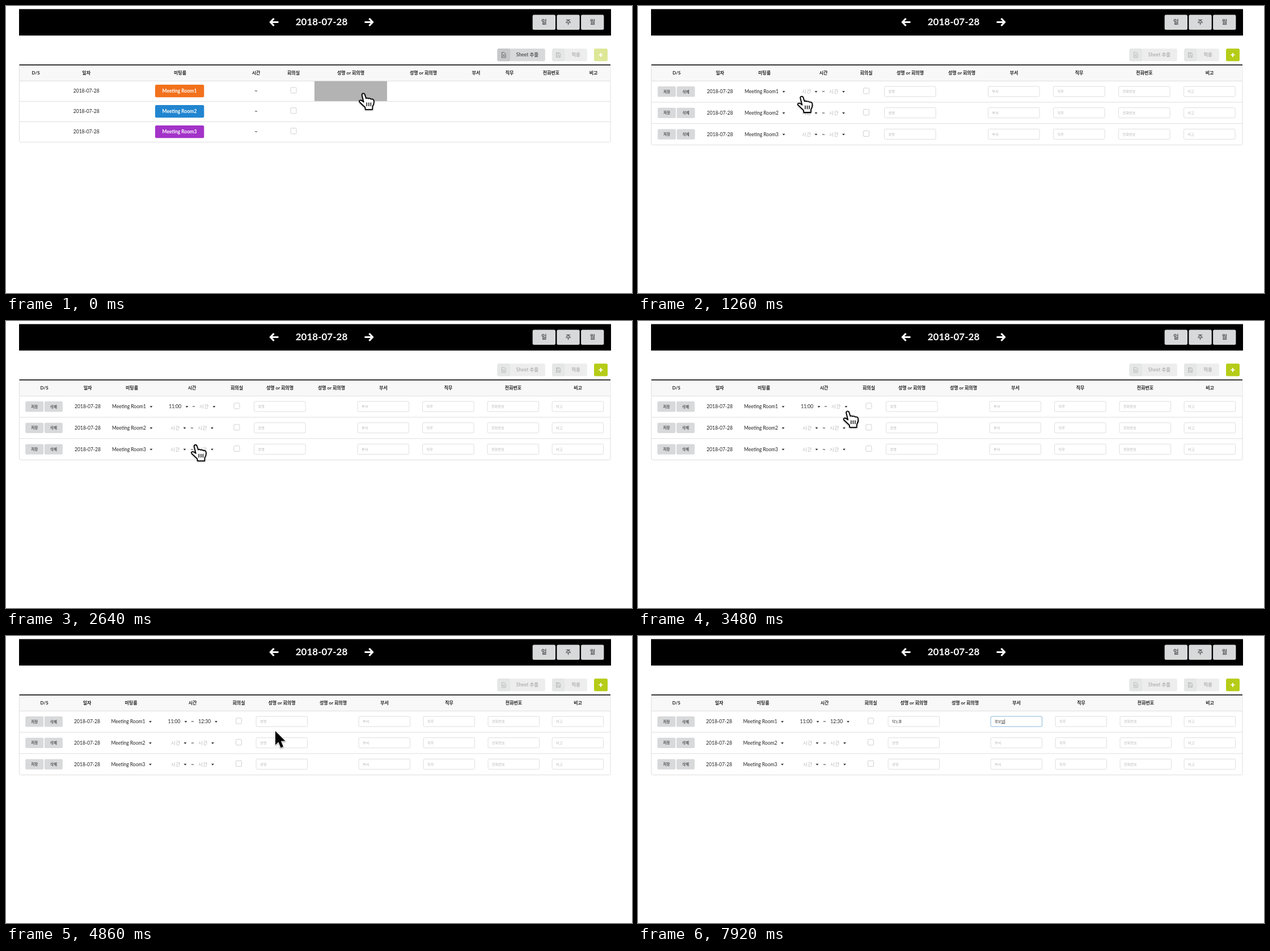
An HTML page for the animation above (8000 ms loop, 1104x507 px).

```html
<!DOCTYPE html>
<html lang="ko">
<head>
<meta charset="utf-8">
<title>회의실 예약</title>
<style>
html, body { margin: 0; width: 100%; height: 100%; overflow: hidden; background: #fff; }
svg { display: block; width: 1104px; height: 507px; font-family: Lato, 'Noto Sans CJK KR', 'Noto Sans CJK', sans-serif; }
.shadow { filter: drop-shadow(0 1px 1.2px rgba(0,0,0,.4)); }
</style>
</head>
<body>
<svg id="stage" viewBox="0 0 1104 507"></svg>
<script>
const stage = document.getElementById('stage');
const LOOP = 8000, STEP = 60;
const INK = '#222', PALE = '#b5b5b5', LINE = '#dededf';

// Moments at which the page changes state
const EDIT = 60, OPEN1 = 1560, PICK1 = 2520, OPEN2 = 3540, PICK2 = 4440;
const FOCUS = 5340, LEAVE = 7080;

const TITLES = ['D/S', '일자', '미팅룸', '시간', '회의실', '성명 or 회의명', '성명 or 회의명', '부서', '직무', '전화번호', '비고'];
const COLUMNS = {
  view:  [52.5, 141.7, 307, 441, 507, 608, 736, 829, 888, 961.5, 1036],
  blank: [68, 144.5, 223, 327, 402.5, 480, 571, 663, 778, 893, 1008],
  start: [67.5, 144, 222, 328, 407, 483, 574, 665.5, 780, 894.5, 1008.5],
  both:  [67.5, 143, 220.5, 329, 410.5, 486.5, 577, 667.5, 781.5, 895.5, 1008.5]
};
const FIELDS = { 5: '성명', 7: '부서', 8: '직무', 9: '전화번호', 10: '비고' };
const ROOM_COLORS = ['#f2711c', '#2185d0', '#a333c8'];

// time, x, y, shape used from here on
const POINTER = [
  [0, 630, 155, 'hand'], [60, 630, 155, 'arrow'], [720, 377, 181, 'arrow'], [840, 321, 167, 'arrow'],
  [1020, 243, 161, 'hand'], [1320, 300, 160, 'hand'], [1560, 300, 160, 'hand'], [1740, 309, 252, 'hand'],
  [1800, 322, 280, 'hand'], [1860, 333, 300, 'hand'], [2100, 320, 306, 'hand'], [2340, 312, 258, 'hand'],
  [2520, 312, 258, 'hand'], [2700, 345, 200, 'arrow'], [2940, 388, 122, 'arrow'], [3180, 392, 158, 'arrow'],
  [3240, 380, 159, 'hand'], [3300, 369.5, 160, 'hand'], [3540, 369.5, 160, 'hand'], [3780, 362, 230, 'hand'],
  [4200, 362, 320, 'hand'], [4440, 362, 320, 'hand'], [4500, 380, 295, 'arrow'], [4860, 475, 168, 'arrow'],
  [4980, 488, 157, 'beam'], [5220, 515, 152, 'beam'], [5400, 515, 152, 'none']
];
const NAME_KEYS = [[5880, 'ㅌ'], [5940, '타'], [6240, '탁'], [6720, '탁ㄴ'], [6780, '탁노'], [6900, '탁노으'], [6960, '탁노을']];
const TEAM_KEYS = [[7200, 'ㅈ'], [7320, '저'], [7440, '정'], [7560, '정ㅂ'], [7680, '정보'], [7860, '정봅'], [7920, '정보보']];

const rect = (x, y, w, h, fill, more = '') =>
  `<rect x="${x}" y="${y}" width="${w}" height="${h}" fill="${fill}" ${more}/>`;
const path = (d, stroke, width, fill = 'none', more = '') =>
  `<path d="${d}" stroke="${stroke}" stroke-width="${width}" fill="${fill}" ${more}/>`;
const text = (s, x, y, { size = 8.5, fill = INK, anchor = 'middle', weight = 400, more = '' } = {}) =>
  `<text x="${x}" y="${y + size * .35}" font-size="${size}" fill="${fill}" text-anchor="${anchor}" font-weight="${weight}" ${more}>${s}</text>`;
const left = (s, x, y, opts) => text(s, x, y, { anchor: 'start', ...opts });
const group = (body, attrs) => `<g ${attrs}>${body}</g>`;
const hline = y => path(`M24 ${y}H1066`, LINE, 1);
const caret = (x, y) => `<path d="M${x - 2.4} ${y - 1}h4.8l-2.4 2.7z" fill="${INK}"/>`;
const checkbox = (x, y) => rect(x - 5, y - 5, 10, 10, '#fff', 'rx="1.5" stroke="#d0d0d1"');
const typed = (keys, t) => keys.reduce((last, [at, s]) => t >= at ? s : last, '');

function topBar() {
  const arrow = (x, dir) => path(`M${x + dir} 22l${dir * 6} 6.5l${-dir * 6} 6.5M${x + dir * 6} 28.5h${-dir * 13}`, '#fff', 3.2);
  const tabs = ['일', '주', '월'].map((s, i) =>
    rect(928.7 + i * 42.7, 15.5, 40.3, 26.5, '#d8d9da', 'rx="2.5"') + text(s, 948.9 + i * 42.7, 28.8, { size: 10.5, weight: 700, fill: '#555' }));
  return rect(23, 5.5, 1044, 46.7, '#000') + arrow(473.5, -1) + arrow(639.5, 1) +
    text('2018-07-28', 556.5, 28.2, { size: 17, weight: 700, fill: '#fff' }) + tabs.join('');
}

function toolbar(t) {
  const mix = Math.max(0, Math.min(1, (t - EDIT + STEP) / 180));
  const button = (x, w, label, icon, cx) =>
    rect(x, 75.3, w, 22.2, '#d8d9da', 'rx="2.5"') + rect(x, 75.3, 22.4, 22.2, '#c7c8c9', 'rx="2.5"') +
    path(icon, '#666', 1) + text(label, cx, 86.4, { weight: 700, fill: '#5a5a5a' });
  const sheet = 'M874.5 82h4l2.5 2.5v6.5h-6.5zM876.2 85.5l3 3.8m0-3.8l-3 3.8';
  const disk = 'M970.5 82.5h5.5l1.5 1.5v6.5h-7zM972 82.5v2.5h3v-2.5M972 90.5v-3h4v3';
  const plus = rect(1037, 75.3, 24, 22.2, '#b5cc18', 'rx="2.5"') + path('M1045.4 86.4h7M1048.9 82.9v7', '#fff', 1.9);
  return group(button(866.5, 84.3, 'Sheet 추출', sheet, 919.5), `opacity="${1 - .55 * mix}"`) +
    group(button(963, 62, '적용', disk, 1005), 'opacity=".45"') +
    group(plus, `opacity="${.45 + .55 * mix}"`);
}

function tableFrame(cols, bottom) {
  return rect(23.5, 104, 1042.5, bottom - 104, '#fff', `rx="2.5" stroke="${LINE}"`) +
    rect(24, 104, 1041.5, 28.5, '#f8f8f9') + path('M23.5 104.1H1066', '#1b1c1d', 1.6) + hline(132.5) +
    TITLES.map((s, i) => text(s, cols[i], 118.5, { size: 8, weight: 700 })).join('');
}

function viewTable() {
  const cols = COLUMNS.view;
  const rows = ROOM_COLORS.map((color, i) => {
    const y = 150.4 + i * 36;
    return (i ? hline(y - 18) : '') + text('2018-07-28', cols[1], y) +
      rect(263, y - 11.3, 86.3, 22.2, color, 'rx="2.5"') +
      text(`Meeting Room${i + 1}`, 306, y, { weight: 700, fill: '#fff' }) +
      text('~', cols[3], y) + checkbox(cols[4], y - 1.6);
  });
  return tableFrame(cols, 240.4) + rect(544, 132.8, 128, 35.2, '#b3b3b4') + rows.join('');
}

function timeCell(t, x, y, row) {
  const first = row === 0 && t >= OPEN1, second = row === 0 && t >= OPEN2;
  const [a, b, c, d, e] = second ? [-43.5, -12, 0, 10.3, 41.5] : first ? [-40.7, -9, 3, 13, 39] : [-38, -13, 0, 10, 35.5];
  const value = (on, pick, time, dx) => !on
    ? left('시간', x + dx, y, { fill: PALE, more: 'letter-spacing=".6"' })
    : left(t < pick ? '09:00' : time, x + dx, y, { fill: t < pick ? '#aaa' : INK });
  return value(first, PICK1, '11:00', a) + caret(x + b, y) + text('~', x + c, y) +
    value(second, PICK2, '12:30', d) + caret(x + e, y);
}

function field(t, x, y, row, col) {
  const named = col === 5, keys = named ? NAME_KEYS : TEAM_KEYS;
  const live = row === 0 && (named || col === 7);
  const focused = live && (named ? t >= FOCUS && t < LEAVE : t >= LEAVE);
  const value = live ? typed(keys, t) : '';
  const x0 = x + 7, end = x0 + value.length * 5.75;
  let out = rect(x, y - 9, 90.5, 18, '#fff', `rx="2" stroke="${focused ? (named ? '#999' : '#85b7d9') : LINE}"`);
  out += left(value || FIELDS[col], x0, y + .3, { size: 6.2, fill: value ? INK : PALE });
  if (focused && value) out += path(`M${end - 5.7} ${y + 3.8}h5.7`, INK, .7);
  if (focused) out += path(`M${end + .4} ${y - 3.8}v8`, INK, .7);
  return out;
}

function editTable(t) {
  const cols = t >= OPEN2 ? COLUMNS.both : t >= OPEN1 ? COLUMNS.start : COLUMNS.blank;
  let out = tableFrame(cols, 245.4);
  for (let row = 0; row < 3; row++) {
    const y = 151.3 + row * 37.7;
    if (row) out += hline(y - 19);
    ['저장', '삭제'].forEach((s, i) => {
      const x = cols[0] - 33.3 + i * 33.7;
      out += rect(x, y - 9.3, 32, 18.4, '#d8d9da', 'rx="2"') + text(s, x + 16, y, { size: 6.5, weight: 700, fill: '#555' });
    });
    out += text('2018-07-28', cols[1], y) + left(`Meeting Room${row + 1}`, cols[2] - 35, y) + caret(cols[2] + 34, y) +
      timeCell(t, cols[3], y, row) + checkbox(cols[4], y - 1.3);
    for (const col in FIELDS) out += field(t, cols[col] - 45.4, y - .3, row, +col);
  }
  return out;
}

function timeMenu(t, x, opened) {
  const itemH = 21.93, top = 157.5;
  const hover = Math.floor((pointerAt(t - STEP).y - top) / itemH);
  const grow = Math.min(1, (t - opened + STEP) / 180);
  let out = rect(x, top, 42.3, 380, '#fff', 'rx="2" stroke="#d4d4d5"');
  for (let i = 0; i < 18; i++) {
    const y = top + i * itemH;
    const label = `${String(9 + (i >> 1)).padStart(2, '0')}:${i % 2 ? '30' : '00'}`;
    if (i === 0 || i === hover) out += rect(x + .5, y, 41.3, itemH, i ? '#ededed' : '#f2f2f2');
    out += text(label, x + 21.2, y + 11.2);
  }
  return group(out, `class="shadow" opacity="${grow}" transform="translate(0 ${top * (1 - grow)}) scale(1 ${grow})"`);
}

function suggestions() {
  return group(rect(440.5, 161, 92, 57, '#fff', 'stroke="#d0d0d0" stroke-width=".6"'), 'class="shadow"') +
    rect(440.8, 193, 91.4, 24.8, '#f1f1f2') + path('M441 193H532', '#ddd', .7) +
    left('탁노을', 448, 177.2, { size: 7.5, weight: 500 }) + left('관리...', 448, 205.6, { size: 7.5 });
}

function pointerAt(t) {
  let i = POINTER.length - 1;
  while (i > 0 && POINTER[i][0] > t) i--;
  const [t0, x0, y0, shape] = POINTER[i];
  const [t1, x1, y1] = POINTER[i + 1] || [t0 + 1, x0, y0];
  const k = Math.max(0, Math.min(1, (t - t0) / (t1 - t0)));
  return { x: x0 + (x1 - x0) * k, y: y0 + (y1 - y0) * k, shape };
}

const SHAPES = {
  hand: path('M-2.3 2Q-2.3 -.6 .2 -.6Q2.2 -.6 2.8 1.6L5 8.2Q7.5 6.8 9.3 8.6Q12 7.4 13.6 9.6Q18.4 8.6 18.8 13Q19.4 18 16.5 22L16.2 27.8H3.8L3.4 24Q-1 20 -6.2 15Q-8 12.6 -5.4 11.6Q-3 11 .8 14.6Z', '#000', 1.8, '#fff', 'stroke-linejoin="round"') +
    path('M6.3 15.5v6.5M9.9 15.5v6.5M13.4 15.5v6.5', '#000', 1.4),
  arrow: path('M0 0V24.5L5.5 19.3L9.6 29.5L14 27.6L9.8 17.6H17.5Z', '#fff', 1.5, '#000', 'paint-order="stroke"'),
  beam: path('M-2.5 -7Q0 -7 0 -5V5Q0 7 -2.5 7M2.5 -7Q0 -7 0 -5M0 5Q0 7 2.5 7', '#222', 1.1),
  none: ''
};

function render(time) {
  const t = Math.floor(time / STEP) * STEP;
  const p = pointerAt(t);
  let out = rect(0, 0, 1104, 507, '#fff') + topBar() + toolbar(t) + (t < EDIT ? viewTable() : editTable(t));
  if (t >= OPEN1 && t < PICK1) out += timeMenu(t, 287.3, OPEN1);
  if (t >= OPEN2 && t < PICK2) out += timeMenu(t, 339.3, OPEN2);
  if (t >= FOCUS && t < LEAVE) out += suggestions();
  out += group(SHAPES[p.shape], `class="shadow" transform="translate(${p.x} ${p.y})"`);
  stage.innerHTML = out;
}

const born = performance.now();
function tick() {
  render((performance.now() - born) % LOOP);
  requestAnimationFrame(tick);
}
tick();
</script>
</body>
</html>
```
